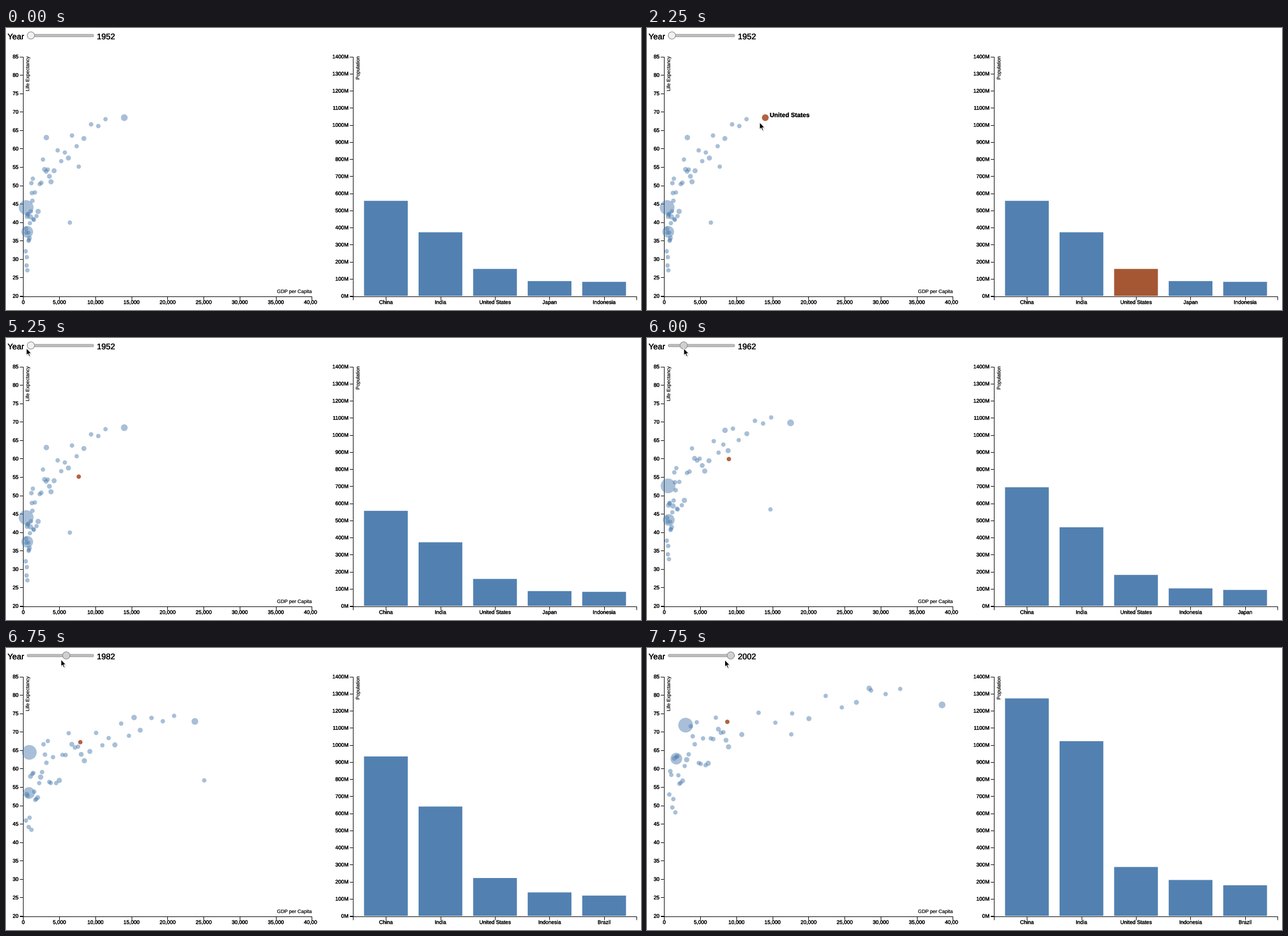
Write a matplotlib script that moves like this. It is 1122 px wide and 499 px high and loops after 8000 ms.

```python
import numpy as np
import matplotlib.pyplot as plt
from matplotlib.animation import FuncAnimation
from matplotlib.patches import Circle, FancyBboxPatch, Polygon, Rectangle
from matplotlib.patheffects import withStroke

W, H, DPI = 1122, 499, 64
FRAMES, STEP = 32, 250
PT = 72 / DPI  # points per pixel

LEFT, TOP, BASE = 30.5, 50.5, 474
BAR_LEFT, BAR_PITCH, BAR_WIDTH = 632.6, 96.4, 77.3
BLUE, RED = "#5281b1", "#a55733"
DOT_BLUE = (0.322, 0.506, 0.694, 0.5)
DOT_RED = (0.65, 0.31, 0.15, 0.88)

plt.rcParams["font.family"] = "Liberation Sans"
plt.rcParams["text.hinting"] = "none"

# Key moments of the data; everything between them is interpolated.
KEY_YEARS = [1952, 1972, 1984.6, 2001.2]

# Leading countries: (GDP in thousands, life expectancy) at the key years.
LEADERS = {
    "China": [(.4, 44), (.68, 63.1), (1.08, 66.4), (2.96, 71.8)],
    "India": [(.55, 37.4), (.72, 50.6), (.9, 57.6), (1.67, 62.7)],
    "United States": [(14, 68.4), (21.8, 71.3), (26.8, 75.1), (38.5, 77.3)],
    "Japan": [(3.2, 63), (14.8, 73.4), (16.2, 74.6), (28.4, 81.8)],
    "Saudi Arabia": [(6.46, 39.9), (24.8, 53.9), (25.5, 61.2), (17.6, 69.3)],
    "Venezuela": [(7.69, 55.1), (10.5, 65.7), (3.96, 69.4), (8.74, 72.7)],
}
LEADER_SHARE = np.array([1, .72, .25, .13, .03, .03])

# The other countries follow a wealth curve, and life grows with log wealth.
OTHERS = 44
WEALTH_AT = [0, .25, .5, .75, .9, 1]
WEALTH = [(.33, .77, 1.5, 3.9, 7.1, 11.4), (.36, 1.07, 2.4, 7.9, 13.5, 19),
          (.35, 2.8, 6.2, 9.6, 15.2, 23.8), (.7, 2.2, 5.2, 9, 24, 32.7)]
LIFE_BASE, LIFE_SLOPE = [41.5, 50, 53, 53.5], [10.5, 7.7, 6.7, 7.8]

rng = np.random.default_rng(7)
RANK = np.linspace(0, 1, OTHERS)
SPREAD = rng.uniform(-9, 9, OTHERS) * (1 - .85 * RANK ** 2)
SHARE = np.append(.025 + .1 * rng.random(OTHERS) ** 4, LEADER_SHARE)
RADIUS = 3.6 + 9.4 * SHARE
NAMES = [""] * OTHERS + list(LEADERS)

# Millions of people in the five largest countries, by rank.
POPULATION = [(556, 862, 1040, 1272), (372, 567, 750, 1022), (157.6, 209.9, 239, 286),
              (86.5, 121.3, 161.5, 210), (82.1, 107.2, 136, 179)]

# Slider year and hovered country, each from the given step on.
SLIDER = {0: 1952, 24: 1962, 25: 1972, 27: 1982, 29: 1992, 30: 1997, 31: 2002}
HOVER = {0: None, 5: "United States", 10: None, 12: "Venezuela"}
TIP_END, GRAB = 17, 22

# The charts trail behind the slider: step, year reached.
TRAIL = [(23, 1952), (24, 1961), (25, 1964), (26, 1972), (28, 1982),
         (29, 1984.6), (31, 2001.2)]

# Pointer path: step, x, y.
PATH = [(1, 298, 174), (2, 298, 174), (3, 239, 165), (4, 210, 159), (5, 206, 159.5),
        (8, 206, 159.5), (9, 199, 167), (11, 133, 243), (13, 124, 245), (16, 124, 245),
        (17, 83, 117), (18, 34, 24), (21, 36, 18), (23, 46, 18), (25, 84, 18.5),
        (26, 87, 20), (31, 137.5, 21)]

ARROW = np.array([(0, 0), (0, 12.6), (2.8, 9.9), (4.9, 14.6),
                  (6.9, 13.7), (4.9, 9.2), (8.9, 9.2)])


def held(keys, i):
    return keys[max(k for k in keys if k <= i)]


def along(path, i):
    at, *tracks = zip(*path)
    return [np.interp(i, at, t) for t in tracks]


def at_year(year, values):
    return np.interp(year, KEY_YEARS, values)


def gdp_x(v):
    return LEFT + v * 12.75


def life_y(v):
    return BASE - (v - 20) * (BASE - TOP) / 65


def pop_y(v):
    return BASE - v * (BASE - TOP) / 1400


fig = plt.figure(figsize=(W / DPI, H / DPI), dpi=DPI, facecolor="white")
ax = fig.add_axes([0, 0, 1, 1])
ax.set_xlim(0, W)
ax.set_ylim(H, 0)
ax.axis("off")


def text(x, y, s, size=9.3, ha="center", color="black", weight=.3, **kw):
    return ax.text(x, y, s, fontsize=size * PT, ha=ha, va="baseline", color=color,
                   path_effects=[withStroke(linewidth=weight, foreground=color)], **kw)


def line(*pts):
    ax.plot(*zip(*pts), color="black", lw=PT, solid_capstyle="butt",
            solid_joinstyle="miter", zorder=2)


def title(x, y, s, angle=0):
    text(x, y, s, 8.75, "right", "#222", .1, rotation=angle, rotation_mode="anchor")


def frame(x0, x1):
    floor = BASE + .5
    line((x0 - 6, TOP), (x0, TOP), (x0, floor), (x0 - 6, floor))
    line((x0, floor + 6), (x0, floor), (x1, floor), (x1, floor + 6))


def y_tick(x, y, s):
    line((x - 6, y), (x, y))
    text(x - 8.5, y + 3.3, s, ha="right")


def x_tick(x, s):
    line((x, BASE + .5), (x, BASE + 6.5))
    return text(x, 488.3, s)


frame(LEFT, 540.5)
for v in range(20, 90, 5):
    y_tick(LEFT, life_y(v), str(v))
for v in range(0, 45, 5):
    x_tick(gdp_x(v), f"{v * 1000:,}")
ax.add_patch(Rectangle((549.7, 480), 12, 12, fc="white", lw=0, zorder=5))
title(41, 50, "Life Expectancy", 90)
title(540.5, 469, "GDP per Capita")

frame(613.5, 1114.5)
for v in range(0, 1500, 100):
    y_tick(613.5, pop_y(v), f"{v}M")
title(624.5, 50, "Population", 90)
bar_names = [x_tick(BAR_LEFT + BAR_PITCH * k + BAR_WIDTH / 2, "") for k in range(5)]
bars = [ax.add_patch(Rectangle((BAR_LEFT + BAR_PITCH * k, 0), BAR_WIDTH, 0,
                               lw=0, snap=False, zorder=1)) for k in range(5)]

text(2.7, 20, "Year", 14.5, "left")
ax.add_patch(FancyBboxPatch((39.5, 13), 113.5, .8, boxstyle="round,pad=1.9",
                            fc="#bdbdbd", ec="#949494", lw=.8 * PT))
thumb = ax.add_patch(Circle((44, 13.2), 6.4, ec="#868686", lw=PT, zorder=4))
year_text = text(160.5, 20, "", 14.5, "left")

dots = ax.scatter(np.zeros(len(NAMES)), np.zeros(len(NAMES)),
                  s=(2 * RADIUS * PT) ** 2, lw=0, zorder=3)
tip = text(0, 0, "", 11, "left", weight=.1, fontweight="bold", zorder=6)
shadow = ax.add_patch(Polygon(ARROW, fc="black", alpha=.16, lw=0, zorder=7))
arrow = ax.add_patch(Polygon(ARROW, fc="black", ec="white", lw=PT, zorder=8))


def dot_places(year):
    curve = [at_year(year, knots) for knots in zip(*WEALTH)]
    gdp = np.interp(RANK, WEALTH_AT, curve)
    life = at_year(year, LIFE_BASE) + at_year(year, LIFE_SLOPE) * np.log(gdp) + SPREAD
    lead = np.array([[at_year(year, v) for v in zip(*p)] for p in LEADERS.values()])
    return np.column_stack([gdp_x(np.append(gdp, lead[:, 0])),
                            life_y(np.append(life, lead[:, 1]))])


def ranking(year):
    if year < 1962:
        last = ["Japan", "Indonesia"]
    else:
        last = ["Indonesia", "Japan" if year < 1982 else "Brazil"]
    return ["China", "India", "United States"] + last


def draw(i):
    shown, marked = held(SLIDER, i), held(HOVER, i)
    year, = along(TRAIL, i)

    thumb.center = (44 + 2.08 * (shown - 1952), 13.2)
    thumb.set_facecolor("#d0d0d0" if i >= GRAB else "#f1f1f1")
    year_text.set_text(str(shown))

    for bar, label, name, sizes in zip(bars, bar_names, ranking(shown), POPULATION):
        top = pop_y(at_year(year, sizes))
        bar.set_y(top)
        bar.set_height(BASE - top)
        bar.set_facecolor(RED if name == marked else BLUE)
        label.set_text(name)

    places = dot_places(year)
    dots.set_offsets(places)
    dots.set_facecolors([DOT_RED if n == marked else DOT_BLUE for n in NAMES])

    tip.set_text("")
    if marked and i < TIP_END:
        k = NAMES.index(marked)
        tip.set_text(marked)
        tip.set_position(places[k] + (RADIUS[k] + 2, RADIUS[k] - 7))

    spot = np.array(along(PATH, i))
    for part, shift in ((arrow, (0, 0)), (shadow, (1, 1.8))):
        part.set_visible(i > 0)
        part.set_xy(ARROW + spot + shift)
    return []


anim = FuncAnimation(fig, draw, frames=FRAMES, interval=STEP, repeat=True,
                     repeat_delay=0, blit=False)
plt.show()
```
